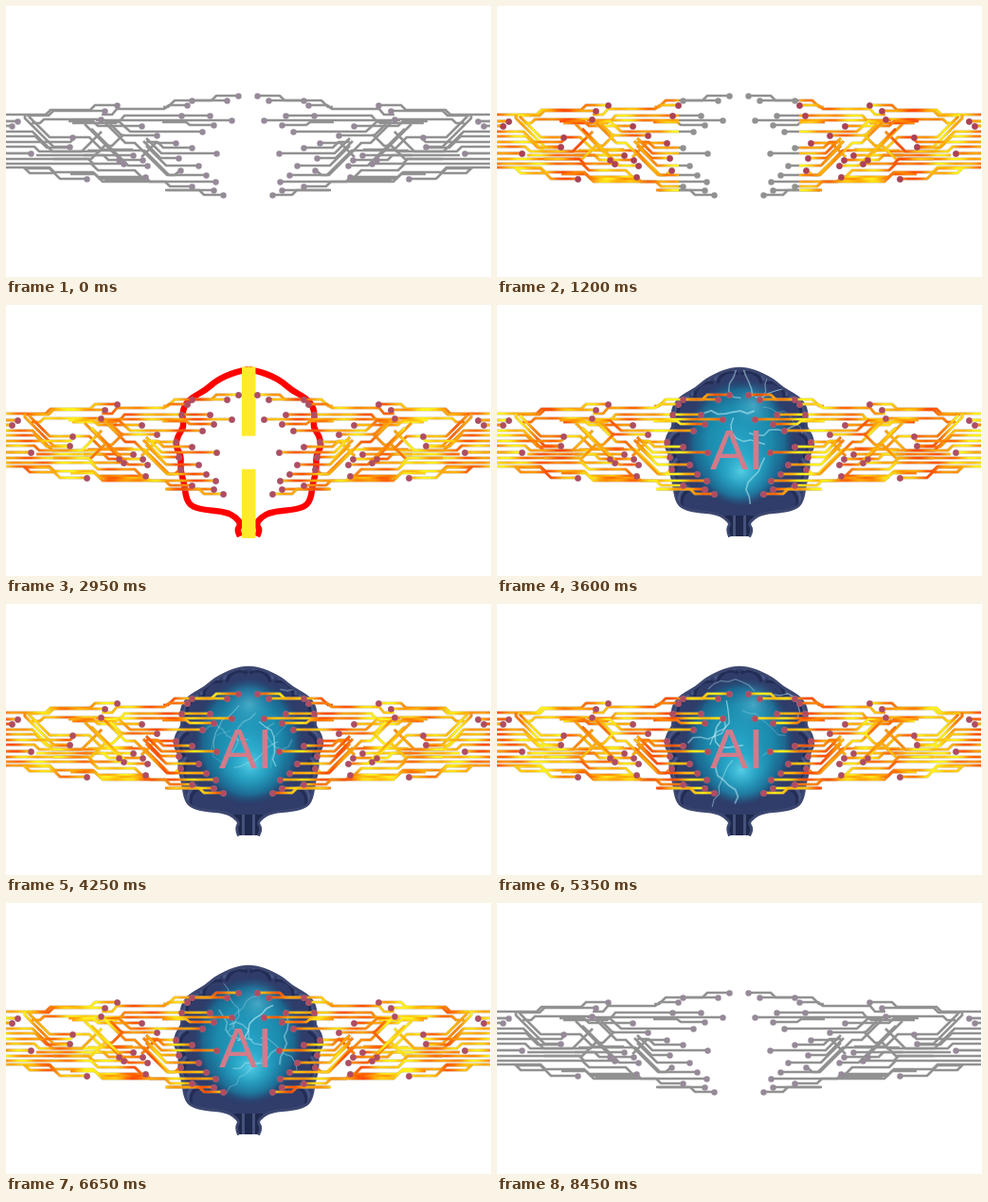
Write an HTML page with a canvas that moves like this. It is 512 px wide and 287 px high and loops after 8.6 s.

```html
<!DOCTYPE html>
<html lang="en">
<head>
<meta charset="utf-8">
<title>AI circuit brain</title>
<style>
html, body { margin: 0; width: 100%; height: 100%; overflow: hidden; background: #fff; }
canvas { display: block; width: 512px; height: 287px; }
</style>
</head>
<body>
<canvas width="512" height="287"></canvas>
<script>
const ctx = document.querySelector('canvas').getContext('2d');
const LOOP = 8600, MIRROR = 511, TAU = Math.PI * 2;
const clamp = v => Math.max(0, Math.min(1, v));
const ramp = (t, a, b) => clamp((t - a) / (b - a));

// Left-hand traces as SVG paths; the right side is their mirror image.
const traces = [
  'M245 95H222L217 100H178L171 107H166',
  'M233 100H200',
  'M191 105H172L167 109H117L112 115H101',
  'M117 105H94L89 110H47L42 115H0',
  'M104 111H50L45 116H22',
  'M100 120H40L36 124H27',
  'M215 116H125L121 121H95',
  'M238 121H120L116 124H70',
  'M219 126H194L190 123H165',
  'M143 127H97L92 122H66',
  'M207 133H131L119 122H104',
  'M159 137H122L110 125',
  'M179 145H158L143 160',
  'M196 150H166L160 144H148',
  'M222 156H164L148 140',
  'M182 161H163L145 143',
  'M203 169H169L148 148',
  'M184 174L178 179H172L146 153H86',
  'M211 179H170L136 145H126L104 123',
  'M221 186H152L147 181H98',
  'M196 191H173L168 186H102L94 178H68',
  'M219 195H170', 'M229 200H209L204 195H168',
  'M12 122H0', 'M6 127H0',
  'M70 139H46L24 117',
  'M67 149H50L20 119V115',
  'M0 133H28L49 154H100',
  'M0 138H31L43 150H66',
  'M0 144H68L73 139H88L101 152H134',
  'M0 149H30L35 154H80L101 133',
  'M26 156H0', 'M134 158H32',
  'M119 163H108L103 158H82',
  'M144 163H121L83 125',
  'M0 162H90L104 148H112L124 136',
  'M124 167H92L87 162H50',
  'M149 169H129L90 130',
  'M0 167H90L97 174H136L146 184H104',
  'M0 171H46L51 176H92L99 183H147',
  'M85 183H57L46 172H20L25 177H50'
].map(d => new Path2D(d));

const dots = [
  [245, 95], [233, 100], [196, 100], [191, 105], [117, 105], [104, 111],
  [100, 120], [185, 116], [215, 116], [238, 121], [219, 126], [143, 127],
  [207, 133], [159, 137], [179, 145], [196, 150], [222, 156], [182, 161],
  [203, 169], [184, 174], [211, 179], [221, 186], [196, 191], [219, 195],
  [229, 200], [12, 122], [6, 127], [70, 139], [67, 149], [26, 156],
  [134, 158], [119, 163], [144, 163], [124, 167], [149, 169], [147, 181], [85, 183]
];

const edge = [
  [256, 68], [241, 71], [222, 80], [211, 90], [196, 98], [188, 107], [186, 118],
  [188, 129], [181, 139], [179, 150], [185, 159], [184, 175], [188, 188],
  [190, 204], [195, 213], [209, 217], [232, 219], [243, 225], [248, 232],
  [244, 238], [247, 245]
];

function curve(points) {
  const p = new Path2D();
  p.moveTo(...points[0]);
  for (let i = 1; i < points.length - 1; i++) {
    const [x, y] = points[i], [nx, ny] = points[i + 1];
    p.quadraticCurveTo(x, y, (x + nx) / 2, (y + ny) / 2);
  }
  p.lineTo(...points[points.length - 1]);
  return p;
}
const half = curve(edge);
const whole = curve([...edge].reverse().concat(edge.slice(1).map(([x, y]) => [512 - x, y])));
const halfLength = edge.slice(1).reduce(
  (sum, p, i) => sum + Math.hypot(p[0] - edge[i][0], p[1] - edge[i][1]), 0);

function random(seed) {
  return () => {
    seed = (seed * 1664525 + 1013904223) >>> 0;
    return seed / 4294967296;
  };
}

function flame(t, row) {
  const g = ctx.createLinearGradient(0, 0, 256, 0);
  for (let i = 0; i <= 40; i++) {
    const x = i * 6.4 - t * 0.16;
    const heat = 0.55 + 0.3 * Math.sin(x / 13 + row * 0.35)
      + 0.22 * Math.sin(x / 5.3 - row) + 0.12 * Math.sin(x / 31 + 2);
    const v = clamp(heat);
    g.addColorStop(i / 40, `rgb(255,${Math.round(75 + 165 * v)},${Math.round(30 * v * v)})`);
  }
  return g;
}

function drawTraces(style) {
  ctx.lineWidth = 2.7;
  traces.forEach((trace, i) => {
    ctx.strokeStyle = style(i);
    ctx.stroke(trace);
  });
}

function drawDots(color, from, to) {
  ctx.fillStyle = color;
  for (const [x, y] of dots) {
    if (x < from || x > to) continue;
    ctx.beginPath();
    ctx.arc(x + 0.5, y + 0.5, 3.2, 0, TAU);
    ctx.fill();
  }
}

function drawSide(t, from, to, flames) {
  const tinted = t < 50 || t > 7000;
  drawTraces(() => '#919191');
  drawDots(tinted ? '#968a99' : '#919191', -9, 300);
  if (to <= from) return;
  ctx.save();
  ctx.beginPath();
  ctx.rect(from, 0, to - from, 287);
  ctx.clip();
  drawTraces(i => flames[i % flames.length]);
  ctx.restore();
  drawDots(t < 1800 ? '#ad4056' : '#b04c63', from, to);
}

function mirrored(draw, axis = MIRROR) {
  ctx.save();
  ctx.translate(axis, 0);
  ctx.scale(-1, 1);
  draw();
  ctx.restore();
}

function drawCircuits(t) {
  const flames = [0, 1, 2, 3, 4, 5].map(row => flame(t, row));
  const front = Math.min(256, t * 0.16);
  const fadeLeft = Math.max(0, (t - 7100) * 0.33);
  const fadeRight = Math.max(0, (t - 6750) * 0.33);
  drawSide(t, fadeLeft, front, flames);
  mirrored(() => drawSide(t, fadeRight, front, flames));
}

function drawOutline(t) {
  const shown = ramp(t, 1800, 2600);
  if (!shown || t > 3500) return;
  ctx.save();
  ctx.globalAlpha = 1 - ramp(t, 3250, 3500);
  ctx.strokeStyle = '#f00';
  ctx.lineWidth = 6.5;
  ctx.lineJoin = 'round';
  ctx.setLineDash([halfLength * shown, 999]);
  ctx.stroke(half);
  mirrored(() => ctx.stroke(half), 512);
  ctx.restore();
}

function drawBars(t) {
  const length = 91 * ramp(t, 2600, 3035);
  if (!length || t > 3500) return;
  ctx.save();
  ctx.globalAlpha = 1 - ramp(t, 3200, 3500);
  ctx.fillStyle = '#ffeb2b';
  ctx.fillRect(249, 65.5, 14.5, length);
  ctx.fillRect(249, 247 - length, 14.5, length);
  ctx.restore();
}

function drawLightning(t) {
  const rnd = random(Math.floor(t / 100) * 7919 + 31);
  for (let n = 0; n < 9; n++) {
    let x = 222 + rnd() * 68, y = 88 + rnd() * 85;
    let angle = rnd() * TAU;
    ctx.beginPath();
    ctx.moveTo(x, y);
    for (let k = 0; k < 7; k++) {
      angle += (rnd() - 0.5) * 1.7;
      x += Math.cos(angle) * 8;
      y += Math.sin(angle) * 8;
      ctx.lineTo(x, y);
    }
    ctx.strokeStyle = `rgba(190,238,248,${0.2 + rnd() * 0.45})`;
    ctx.lineWidth = 0.7 + rnd() * 1.2;
    ctx.stroke();
  }
}

function glow(x, y, r, stops) {
  const g = ctx.createRadialGradient(x, y, 0, x, y, r);
  stops.forEach(([at, color]) => g.addColorStop(at, color));
  ctx.fillStyle = g;
  ctx.fillRect(x - r, y - r, 2 * r, 2 * r);
}

function drawFolds() {
  ctx.lineWidth = 3;
  for (const [x, y, r, start] of [
    [244, 82, 14, 3.3], [221, 94, 15, 3], [202, 111, 14, 2.8],
    [196, 147, 15, 2.3], [200, 174, 15, 2], [207, 206, 15, 2.4]
  ]) {
    ctx.strokeStyle = 'rgba(100,115,165,.45)';
    ctx.beginPath();
    ctx.arc(x, y, r, start, start + 2);
    ctx.stroke();
    ctx.strokeStyle = 'rgba(20,28,65,.5)';
    ctx.beginPath();
    ctx.arc(x + 3, y + 3, r, start, start + 2);
    ctx.stroke();
  }
}

function drawBrain(t) {
  const alpha = ramp(t, 3050, 3500);
  if (!alpha || t >= 8450) return;
  const close = ramp(t, 8046, 8425);
  const top = 65 + 85 * close, bottom = 247 - 97 * close;
  ctx.save();
  ctx.globalAlpha = alpha;
  ctx.beginPath();
  ctx.rect(170, top, 172, bottom - top);
  ctx.clip();
  ctx.lineWidth = 6;
  ctx.lineJoin = 'round';
  ctx.strokeStyle = '#3c4770';
  ctx.stroke(whole);
  ctx.clip(whole);
  ctx.fillStyle = '#303c69';
  ctx.fillRect(170, 60, 172, 190);
  drawFolds();
  mirrored(drawFolds, 512);
  const pulse = Math.sin(t / 260);
  ctx.save();
  ctx.translate(256, 146);
  ctx.scale(0.86, 1);
  glow(0, 0, 70, [
    [0, '#26a4c6'], [0.55, '#1c8bad'], [0.8, 'rgba(27,105,145,.95)'], [1, 'rgba(38,58,105,0)']
  ]);
  ctx.restore();
  glow(258, 172 + 4 * pulse, 36, [
    [0, 'rgba(100,220,242,.8)'], [0.5, 'rgba(50,185,216,.45)'], [1, 'rgba(40,160,200,0)']
  ]);
  glow(262 + 9 * pulse, 106, 27, [
    [0, 'rgba(120,210,230,.45)'], [1, 'rgba(40,150,190,0)']
  ]);
  drawLightning(t);
  ctx.fillStyle = '#1e294d';
  ctx.fillRect(241, 223, 30, 25);
  ctx.fillStyle = '#46527c';
  ctx.fillRect(249, 223, 3, 24);
  ctx.fillRect(260, 223, 3, 24);
  ctx.font = '60px "Liberation Sans", Arial, sans-serif';
  ctx.fillStyle = '#d27b8a';
  ctx.fillText('AI', 225, 174);
  ctx.restore();
}

function draw(time) {
  const t = Math.floor((time % LOOP) / 50) * 50;
  ctx.fillStyle = '#fff';
  ctx.fillRect(0, 0, 512, 287);
  drawOutline(t);
  drawBars(t);
  drawBrain(t);
  drawCircuits(t);
}

const started = performance.now();
function tick() {
  draw(performance.now() - started);
  requestAnimationFrame(tick);
}
tick();
</script>
</body>
</html>
```
